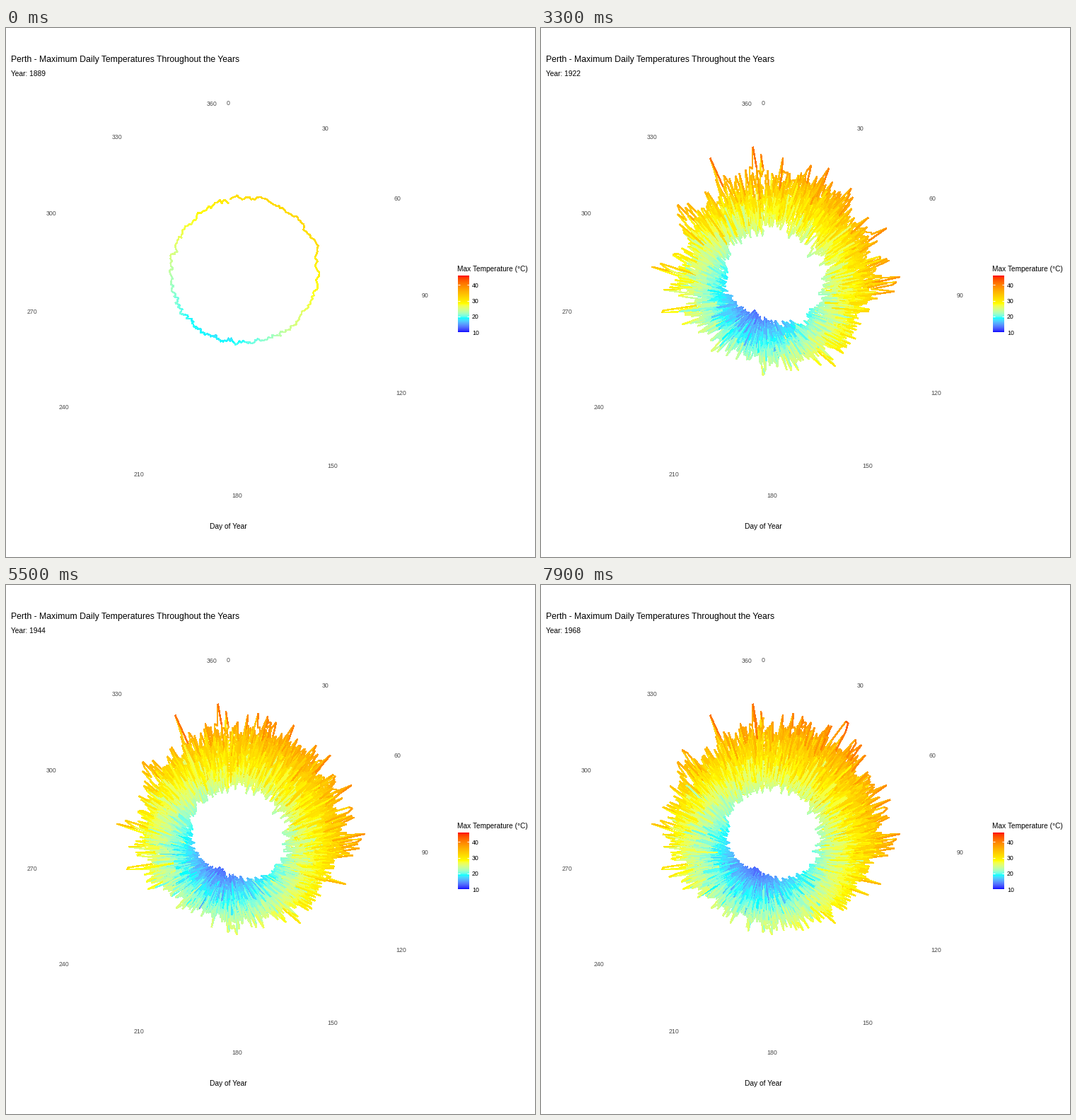
These frames come from a looping animation (748x748 px, 8 s). A matplotlib script:

```python
import numpy as np
import matplotlib.pyplot as plt
from matplotlib.animation import FuncAnimation
from matplotlib.collections import LineCollection
from matplotlib.colors import to_rgb

SIZE, DPI = 748, 100
PX = 72 / DPI
CX, CY = 314.5, 383
R_MAX, R_LABEL = 247, 278
FIRST, COUNT = 1889, 80
RECORDS_BEGIN = 1902  # earlier years only show the daily average

plt.rcParams["font.family"] = "Liberation Sans"

# Colour ramp, blended in CIE Lab
TO_XYZ = np.array([[0.4124, 0.3576, 0.1805],
                   [0.2126, 0.7152, 0.0722],
                   [0.0193, 0.1192, 0.9505]])
WHITE = TO_XYZ.sum(axis=1)
TO_LAB = np.array([[0, 116, 0], [500, -500, 0], [0, 200, -200]])


def rgb_to_lab(rgb):
    lin = np.where(rgb > 0.04045, ((rgb + 0.055) / 1.055) ** 2.4, rgb / 12.92)
    t = lin @ TO_XYZ.T / WHITE
    f = np.where(t > 0.008856, np.cbrt(t), 7.787 * t + 16 / 116)
    return f @ TO_LAB.T


def lab_to_rgb(lab):
    f = lab @ np.linalg.inv(TO_LAB).T
    t = np.where(f > 0.2069, f ** 3, (f - 16 / 116) / 7.787)
    lin = np.clip((t * WHITE) @ np.linalg.inv(TO_XYZ).T, 0, 1)
    rgb = np.where(lin > 0.0031308, 1.055 * lin ** (1 / 2.4) - 0.055, 12.92 * lin)
    return np.clip(rgb, 0, 1)


STOPS = rgb_to_lab(np.array([to_rgb(c) for c in
                             ("blue", "cyan", "yellow", "orange", "red")]))


def ramp(v):
    knots = np.linspace(0, 1, len(STOPS))
    return lab_to_rgb(np.stack([np.interp(v, knots, c) for c in STOPS.T], axis=-1))


# Daily radii: seasonal waves plus day-to-day weather
days = np.arange(1, 366)
theta = 2 * np.pi * days / 365
rng = np.random.default_rng(12)


def wave(size, peak, cycles=1):
    return size * np.cos(cycles * theta - np.radians(peak))


def red_noise(keep):
    """Unit noise in which each day remembers part of the day before."""
    z = rng.normal(size=days.size)
    for i in range(1, days.size):
        z[i] = keep * z[i - 1] + np.sqrt(1 - keep ** 2) * z[i]
    return z


average = 98 + wave(46, 29) + wave(6, 70, 2) + 2 * red_noise(0.6)
warm = 155 + wave(54, 21) - average
cold = average - 50 - wave(35, 24)


def weather():
    """One year: hot days form long spikes, cold days level off."""
    z = red_noise(0.62)
    size = np.abs(z)
    hot = warm * np.minimum((size / 3) ** 1.2, 1.25)
    return average + np.where(z > 0, hot, -cold * np.tanh(size / 2.3))


def polar(angle, r):
    return CX + r * np.sin(angle), CY - r * np.cos(angle)


fig = plt.figure(figsize=(SIZE / DPI, SIZE / DPI), dpi=DPI, facecolor="white")
ax = fig.add_axes([0, 0, 1, 1])
ax.axis("off")


def label(x, y, text, size, color="black", ha="left"):
    return ax.text(x, y, text, fontsize=size * PX, color=color,
                   ha=ha, va="baseline")


def add_ring(r, z):
    pts = np.column_stack(polar(theta, r))
    segments = np.stack([pts[:-1], pts[1:]], axis=1)
    ring = LineCollection(segments, colors=ramp(r[:-1] / R_MAX), zorder=z,
                          linewidths=1.4 * PX, antialiaseds=False)
    ax.add_collection(ring, autolim=False)
    return ring


rings = {FIRST: add_ring(average, 2)}
for year in range(RECORDS_BEGIN, FIRST + COUNT):
    rings[year] = add_ring(weather(), 2 + (year - FIRST) / 100)

# Labels
label(7.5, 48, "Perth - Maximum Daily Temperatures Throughout the Years", 12.2)
year_text = label(7.5, 67.5, "", 10.3)
label(314.5, 708, "Day of Year", 10.3, ha="center")
for day in range(0, 361, 30):
    x, y = polar(2 * np.pi * day / 365, R_LABEL)
    label(x, y + 3.5, str(day), 8.8, "#4d4d4d", "center")

# Legend
LEFT, RIGHT, TOP, BOTTOM = 639, 655, 350, 430
label(638.5, 343.5, "Max Temperature (°C)", 10.1)
ax.imshow(ramp(np.linspace(1, 0, 300))[:, None], aspect="auto",
          extent=(LEFT, RIGHT, BOTTOM, TOP), interpolation="nearest")
for temp in range(10, 50, 10):
    y = 430 - (temp - 10) * 2.22
    for x in (LEFT, RIGHT - 3):
        ax.plot([x, x + 3], [y, y], color="white", lw=PX,
                solid_capstyle="butt")
    label(659, y + 3.5, str(temp), 8.8)

ax.set_xlim(0, SIZE)
ax.set_ylim(SIZE, 0)


def draw(i):
    now = FIRST + i
    year_text.set_text(f"Year: {now}")
    for year, ring in rings.items():
        ring.set_visible(year <= now)
    return [year_text, *rings.values()]


anim = FuncAnimation(fig, draw, frames=COUNT, interval=100, repeat=True)
plt.show()
```
